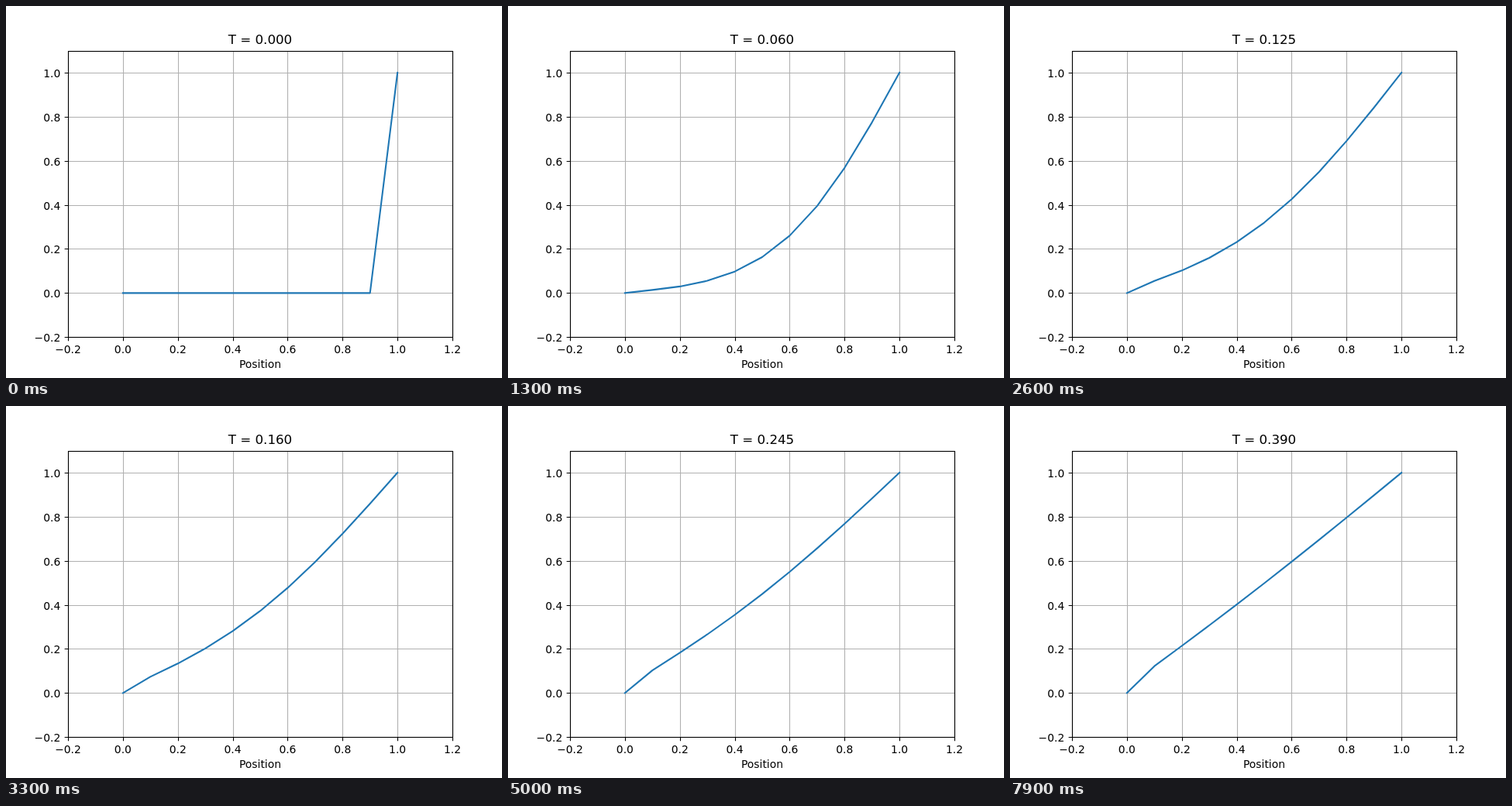
Animation of 640x480 px, one loop 8000 ms. Source, as an HTML page:

```html
<!DOCTYPE html>
<html lang="en">
<head>
<meta charset="utf-8">
<title>Diffusion along a rod</title>
<style>
  html, body { margin: 0; width: 100%; height: 100%; overflow: hidden; background: #fff; }
  svg { display: block; width: 640px; height: 480px; }
  text { font: 13.89px "DejaVu Sans", sans-serif; fill: #000; text-anchor: middle; }
  #yLabels text { text-anchor: end; }
  #title { font-size: 16.67px; }
  path, rect { fill: none; stroke-width: 1.11; }
  #grid { stroke: #b0b0b0; }
  #ticks, #frame { stroke: #000; }
  #curve { stroke: #1f77b4; stroke-width: 2.08; stroke-linejoin: round; stroke-linecap: square; }
</style>
</head>
<body>
<svg viewBox="0 0 640 480">
  <path id="grid"/>
  <path id="curve"/>
  <path id="ticks"/>
  <rect id="frame" x="80.5" y="58.5" width="496" height="369"/>
  <g id="xLabels"></g>
  <g id="yLabels"></g>
  <text x="328" y="467">Position</text>
  <text id="title" x="328" y="49"></text>
</svg>
<script>
  const STEP_MS = 100, STEPS = 80, DT = 0.005;
  const CELLS = 10, DX = 1 / CELLS, R = DT / (DX * DX);
  const $ = id => document.getElementById(id);

  const px = x => 80 + (x + 0.2) / 1.4 * 496;
  const py = y => 427.2 - (y + 0.2) / 1.3 * 369.6;
  const snap = v => Math.floor(v + 0.5) + 0.5;

  function addLabel(group, x, y, value) {
    const label = document.createElementNS("http://www.w3.org/2000/svg", "text");
    label.setAttribute("x", x);
    label.setAttribute("y", y);
    label.textContent = value.toFixed(1).replace("-", "\u2212");
    $(group).append(label);
  }

  function drawAxes() {
    let grid = "", ticks = "";
    for (let i = -1; i <= 6; i++) {
      const v = i / 5, x = snap(px(v));
      grid += `M${x} 58V427`;
      ticks += `M${x} 427.5v4.86`;
      addLabel("xLabels", px(v), 448, v);
      if (i > 5) continue;
      const y = snap(py(v));
      grid += `M80 ${y}H576`;
      ticks += `M80.5 ${y}h-4.86`;
      addLabel("yLabels", 70.3, y + 5, v);
    }
    $("grid").setAttribute("d", grid);
    $("ticks").setAttribute("d", ticks);
  }

  // One implicit diffusion step; the left end is reset to zero after the solve.
  function diffuse(u) {
    const c = [], d = [], next = [...u];
    for (let i = 0; i < CELLS; i++) {
      const m = 1 + 2 * R - R * (c[i - 1] || 0);
      c[i] = R / m;
      d[i] = (u[i] + R * (d[i - 1] || 0)) / m;
    }
    for (let i = CELLS - 1; i >= 0; i--) next[i] = d[i] + c[i] * next[i + 1];
    next[0] = 0;
    return next;
  }

  const states = [[...Array(CELLS).fill(0), 1]];
  while (states.length < STEPS) states.push(diffuse(states[states.length - 1]));

  const start = performance.now();
  let shown = -1;

  function draw() {
    const n = Math.floor((performance.now() - start) / STEP_MS) % STEPS;
    if (n !== shown) {
      shown = n;
      const points = states[n].map((u, i) => `${px(i * DX).toFixed(2)} ${py(u).toFixed(2)}`);
      $("curve").setAttribute("d", "M" + points.join("L"));
      $("title").textContent = "T = " + (Math.max(0, n - 1) * DT).toFixed(3);
    }
    requestAnimationFrame(draw);
  }

  drawAxes();
  draw();
</script>
</body>
</html>
```
